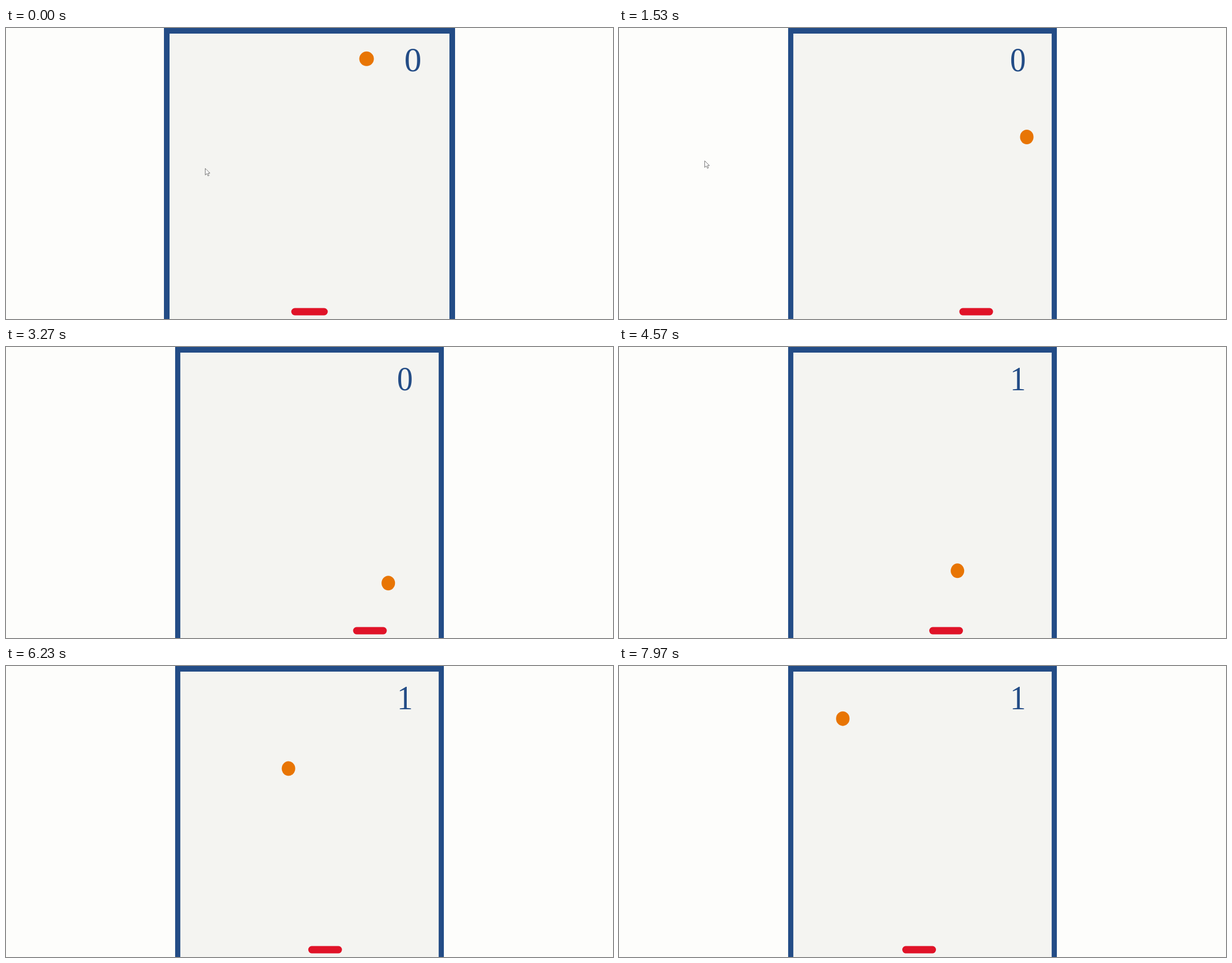
Animation, 1080 px wide and 518 px high, one loop 8 s. Source, as an HTML page:

```html
<!DOCTYPE html>
<html lang="en">
<head>
<meta charset="utf-8">
<title>Paddle ball</title>
<style>
  html, body { margin: 0; width: 100%; height: 100%; overflow: hidden; background: #fdfdfb; }
  svg { display: block; width: 100%; height: 100%; }
  text { font: 61px "Liberation Serif", "Times New Roman", serif; text-anchor: middle; }
</style>
</head>
<body>
<svg viewBox="0 0 1080 518">
  <g id="court">
    <rect x="281" width="518" height="518" fill="#234c86"/>
    <rect x="291" y="10" width="498" height="508" fill="#f4f4f1"/>
    <text id="score" x="724" y="77" fill="#234c86">0</text>
    <rect id="paddle" x="-32.5" y="498.5" width="65" height="13" rx="6.5" fill="#e01328"/>
    <circle id="ball" r="13" fill="#e87504"/>
  </g>
  <path id="cursor" d="M.5 .5V12.2L3.3 9.6L5.3 13.8L7.2 13L5.3 8.9H9Z" fill="#fff" stroke="#555" stroke-width=".8"/>
</svg>
<script>
const LOOP = 8000;
const SQUEEZE = { to: 0.923, end: 1180 };
const CURSOR = { start: 70, end: 850, hide: 2900 };

// Limits of the ball's centre, and its speed in px/ms.
const BOUNDS = { left: 307, right: 773, top: 25, bottom: 493.8 };
const BALL = { x: 641.5, y: 55, vx: 0.065, vy: -0.13 };

// From each time on, the paddle heads for the given x at constant speed.
const PADDLE = { x: 540, speed: 0.11 };
const GOALS = [[500, 643.5], [2500, 656.5], [3900, 585.5], [5150, 617.5], [5800, 533.5]];

const el = id => document.getElementById(id);
const [court, score, paddle, ball, cursor] =
  ["court", "score", "paddle", "ball", "cursor"].map(el);
const clamp = (v, lo = 0, hi = 1) => Math.min(hi, Math.max(lo, v));
const lerp = (a, b, p) => a + (b - a) * p;
const smooth = p => p * p * (3 - 2 * p);
const place = (node, x, y) => node.setAttribute("transform", `translate(${x} ${y})`);

// Reflects a straight path between two walls.
function bounce(v, lo, hi) {
  const span = hi - lo;
  const turn = 2 * span;
  const offset = ((v - lo) % turn + turn) % turn;
  return lo + span - Math.abs(span - offset);
}

function paddleAt(time) {
  return GOALS.reduce((x, [start, goal]) => {
    const reach = Math.max(0, time - start) * PADDLE.speed;
    return x + clamp(goal - x, -reach, reach);
  }, PADDLE.x);
}

function paddleHits(y) {
  const height = BOUNDS.bottom - BOUNDS.top;
  return Math.floor((BOUNDS.top - y + height) / (2 * height));
}

function draw(time) {
  const scale = lerp(1, SQUEEZE.to, clamp(time / SQUEEZE.end));
  court.setAttribute("transform", `translate(540 0) scale(${scale} 1) translate(-540 0)`);

  const x = BALL.x + BALL.vx * time;
  const y = BALL.y + BALL.vy * time;
  place(ball, bounce(x, BOUNDS.left, BOUNDS.right), bounce(y, BOUNDS.top, BOUNDS.bottom));
  place(paddle, paddleAt(time), 0);
  score.textContent = paddleHits(y);

  const glide = smooth(clamp((time - CURSOR.start) / (CURSOR.end - CURSOR.start)));
  place(cursor, lerp(354, 152, glide), lerp(249.5, 236, glide));
  cursor.style.display = time < CURSOR.hide ? "" : "none";
}

const start = performance.now();
function tick() {
  draw((performance.now() - start) % LOOP);
  requestAnimationFrame(tick);
}
tick();
</script>
</body>
</html>
```
